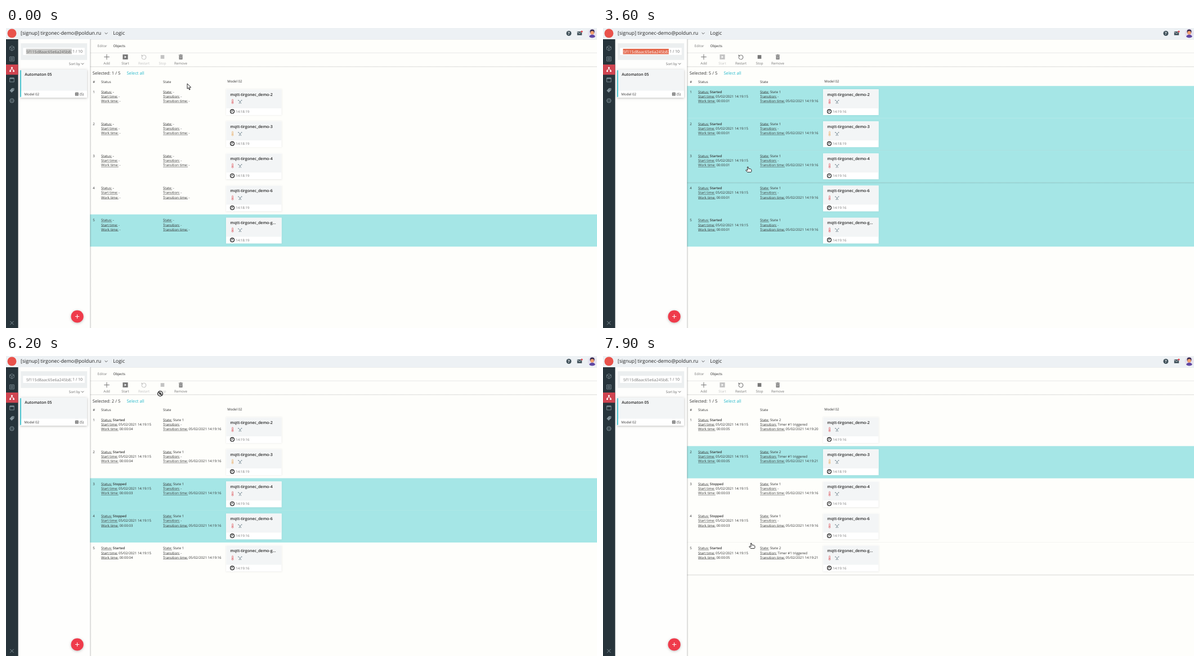
An HTML page with a canvas for the animation above (8 s loop, 1050x534 px).

```html
<!DOCTYPE html>
<html lang="en">
<head>
<meta charset="utf-8">
<title>Logic</title>
<style>
html, body { margin: 0; width: 100%; height: 100%; overflow: hidden; background: #fefefb; }
canvas { display: block; width: 1050px; height: 534px; }
</style>
</head>
<body>
<canvas id="stage" width="1050" height="534"></canvas>
<script>
const ctx = document.getElementById('stage').getContext('2d');
const LOOP = 8000, STEP = 100;
const ROW_TOP = 103.2, ROW_H = 57.15;
const TEAL = '#a5e6e6', INK = '#333', CREAM = '#fefefb', GREY = '#f3f5f6';
const BUTTONS = [['Add', 179], ['Start', 212], ['Restart', 245], ['Stop', 278], ['Remove', 310.5]];
const NAMES = ['2', '3', '4', '6', 'g...'].map(s => 'mqtt-tirgonec_demo-' + s);

// start time, steps, target x, target y
const MOVES = [
  [100, 2, 270, 82], [400, 1, 245.5, 78.5], [1000, 4, 212, 61], [3100, 6, 258, 247],
  [4000, 3, 246, 299], [4600, 9, 273, 62], [6800, 4, 289.5, 207.5], [7600, 4, 264, 333]
];

function text(str, x, y, size = 6.08, color = INK, weight = 400, align = 'left') {
  ctx.font = `${weight} ${size}px "Open Sans", "Noto Sans", sans-serif`;
  ctx.fillStyle = color;
  ctx.textAlign = align;
  ctx.fillText(str, x, y);
  return ctx.measureText(str).width;
}
function rect(x, y, w, h, color) {
  ctx.fillStyle = color;
  ctx.fillRect(x, y, w, h);
}
function disc(x, y, r, color) {
  ctx.fillStyle = color;
  ctx.beginPath();
  ctx.arc(x, y, r, 0, 7);
  ctx.fill();
}
function ring(x, y, r, color, width = 1) {
  ctx.strokeStyle = color;
  ctx.lineWidth = width;
  ctx.beginPath();
  ctx.arc(x, y, r, 0, 7);
  ctx.stroke();
}
function frame(x, y, w, h, color, width = 1) {
  ctx.strokeStyle = color;
  ctx.lineWidth = width;
  ctx.strokeRect(x, y, w, h);
}
function line(color, width, ...p) {
  ctx.strokeStyle = color;
  ctx.lineWidth = width;
  ctx.beginPath();
  for (let i = 0; i < p.length; i += 2) ctx.lineTo(p[i], p[i + 1]);
  ctx.stroke();
}
function poly(x, y, pts, fill, stroke) {
  ctx.beginPath();
  for (let i = 0; i < pts.length; i += 2) ctx.lineTo(x + pts[i], y + pts[i + 1]);
  ctx.closePath();
  ctx.fillStyle = fill;
  ctx.fill();
  if (stroke) {
    ctx.strokeStyle = stroke;
    ctx.lineWidth = 0.9;
    ctx.stroke();
  }
}
function shadow(blur, alpha, dy, draw) {
  ctx.save();
  ctx.shadowColor = `rgba(0,0,0,${alpha})`;
  ctx.shadowBlur = blur;
  ctx.shadowOffsetY = dy;
  draw();
  ctx.restore();
}
function fade(x, y, w, h, horizontal, alpha) {
  const g = ctx.createLinearGradient(x, y, horizontal ? x + w : x, horizontal ? y : y + h);
  g.addColorStop(0, `rgba(0,0,0,${alpha})`);
  g.addColorStop(1, 'rgba(0,0,0,0)');
  rect(x, y, w, h, g);
}

function pointerAt(t) {
  let x = 322, y = 99;
  for (const [start, steps, tx, ty] of MOVES) {
    if (t < start) break;
    const k = Math.min(1, ((t - start) / STEP + 1) / steps);
    const e = k * k * (3 - 2 * k);
    x += (tx - x) * e;
    y += (ty - y) * e;
  }
  return { x, y };
}

function stateAt(t) {
  const p = pointerAt(t);
  const running = (t >= 1900 && t < 5800) || t >= 7300;
  const stopping = t >= 5600 && t < 5800;
  const enabled = [true, !running, running, running && !stopping, true];
  const row = Math.floor((p.y - ROW_TOP) / ROW_H);
  const button = p.y > 46 && p.y < 68 ? BUTTONS.findIndex(b => Math.abs(p.x - b[1]) < 14) : -1;
  const onLink = p.y > 76 && p.y < 85 && p.x > 213 && p.x < 247;
  const selected = t < 800 ? [4] : t < 3700 ? [0, 1, 2, 3, 4] : t < 4400 ? [2] : t < 7300 ? [2, 3] : [1];
  let cursor = 'arrow';
  if (row >= 0 && row < 5 || onLink) cursor = 'hand';
  if (button >= 0) cursor = enabled[button] || stopping ? 'hand' : 'blocked';
  return { t, p, enabled, row, button, onLink, selected, cursor };
}

function rowData(i, t) {
  if (t < 1900 + i * STEP) return ['-', '-', '-', '-', '-', '-'];
  const day = '05/02/2021 14:19:';
  const stopped = (i === 2 || i === 3) && t >= 5800;
  const lag = i < 4 ? 0 : t > 7000 ? 200 : 100;
  const secs = stopped ? 3 : Math.max(0, Math.floor((t - 2100 - lag) / 1000));
  const fired = i === 0 ? t >= 7000 : (i === 1 || i === 4) && t >= 7300;
  const moved = fired ? (i === 0 ? 20 : 21) : t < 2600 ? 15 : 16;
  return [
    stopped ? 'Stopped' : 'Started', day + 15, '00:00:0' + secs,
    fired ? 'State 2' : 'State 1', fired ? 'Timer #1 triggered' : '-', day + moved
  ];
}

function field(label, value, x, y, weight) {
  const w = text(label, x, y);
  rect(x, y + 0.6, w, 0.5, INK);
  text(value, x + w + 1.6, y, undefined, INK, weight);
}

function network(x, y, color) {
  for (const side of [-1, 1]) {
    line(color, 0.5, x, y, x + side * 2.6, y - 2);
    line(color, 0.5, x, y, x + side * 1.3, y + 2.6);
    ring(x + side * 2.8, y - 2.2, 0.6, color, 0.6);
    disc(x + side * 1.4, y + 2.8, 0.7, color);
  }
  disc(x, y, 0.7, color);
}

function drawRow(i, s) {
  const y = ROW_TOP + i * ROW_H, on = s.selected.includes(i);
  if (on) rect(149, y, 901, ROW_H + 0.2, TEAL);
  const d = rowData(i, s.t);
  text(i + 1, 154.3, y + 12.5);
  ['Status:', 'Start time:', 'Work time:', 'State:', 'Transition:', 'Transition time:'].forEach((label, k) =>
    field(label, d[k], k < 3 ? 169 : 279, y + 12.5 + (k % 3) * 8.22, k ? 400 : 600));

  shadow(2, on ? 0.06 : 0.1, 0.3, () => rect(391, y + 5.8, 98.7, 46, '#fff'));
  rect(391.4, y + 6.2, 98, 33.6, GREY);
  text(NAMES[i], 398.3, y + 17.5, 7.03, '#222', 600);

  const heat = i === 1 ? '#e8ad62' : '#df5a60';
  ctx.strokeStyle = heat;
  ctx.lineWidth = 0.7;
  ctx.beginPath();
  ctx.roundRect(401.6, y + 23.8, 1.9, 5.4, 0.9);
  ctx.stroke();
  ring(402.5, y + 30, 1.4, heat, 0.8);
  network(415.8, y + 27.8, '#58707c');

  ring(402, y + 45.4, 3.4, '#111', 1.2);
  line('#111', 0.9, 402, y + 43, 402, y + 45.6, 400.5, y + 45.6);
  const updated = s.t >= 2600 && i !== 1;
  text(updated ? '14:19:16' : '14:18:19', 408.3, y + 47.8, 6.08, '#777');
}

function hoverEdge(i) {
  if (i < 0 || i > 4) return;
  const y = ROW_TOP + i * ROW_H;
  rect(149, y - 0.4, 901, 0.7, 'rgba(0,0,0,.06)');
  fade(149, y + ROW_H, 901, 2.6, false, 0.13);
}

function toolIcon(k, x, c) {
  const y = 51.5;
  if (k === 0) {
    rect(x - 4.8, y - 0.5, 9.6, 1, c);
    rect(x - 0.5, y - 4.8, 1, 9.6, c);
  } else if (k === 1) {
    rect(x - 4.6, y - 4.4, 9.2, 8.8, c);
    poly(x, y, [-1.4, -2.2, 2, 0, -1.4, 2.2], '#fff');
  } else if (k === 2) {
    ctx.strokeStyle = c;
    ctx.lineWidth = 1.1;
    ctx.beginPath();
    ctx.arc(x, y + 0.5, 3.8, -2.2, 3.3);
    ctx.stroke();
    poly(x, y, [-4.4, -4.4, -4.4, -0.8, -0.9, -0.9], c);
  } else if (k === 3) {
    rect(x - 3.3, y - 3.3, 6.6, 6.6, c);
  } else {
    rect(x - 3.7, y - 3.9, 7.4, 1.1, c);
    rect(x - 1.3, y - 4.7, 2.6, 1, c);
    rect(x - 3, y - 2.2, 6, 6.7, c);
    for (const dx of [-1.2, 1.2]) rect(x + dx - 0.3, y - 1, 0.6, 4.2, '#fff');
  }
}

function drawTop() {
  rect(0, 0, 1050, 20, '#edf1f4');
  disc(10.5, 9.5, 8, '#e9524b');
  text('[signup] tirgonec-demo@poldun.ru', 26, 12.4, 8.75, '#222');
  line('#444', 0.9, 175.6, 8.3, 178, 10.7, 180.4, 8.3);
  text('Logic', 190.2, 12.4, 8.75, '#222');

  disc(1000, 9.5, 4.5, '#42535c');
  text('?', 1000, 12, 7, '#fff', 700, 'center');
  rect(1014.8, 6.2, 8.4, 6.6, '#42535c');
  line('#edf1f4', 0.8, 1015, 7, 1019, 9.8, 1023, 7);
  disc(1023, 6.2, 1.5, '#e53945');

  disc(1041.5, 9.5, 8, '#e5e1ef');
  ctx.save();
  ctx.beginPath();
  ctx.arc(1041.5, 9.5, 8, 0, 7);
  ctx.clip();
  disc(1041.5, 17.2, 5.6, '#6047a3');
  disc(1041.5, 6.5, 4, '#35294f');
  disc(1041.5, 8.4, 3.2, '#f2a06f');
  ctx.restore();
}

function drawMain(s) {
  rect(149, 20, 901, 514, CREAM);
  rect(149, 20, 901, 0.6, '#e2e5e7');
  text('Editor', 162.6, 33.6, 6.08, '#777');
  text('Objects', 190.6, 33.6, 6.08, '#222');
  rect(149, 43.8, 901, 0.8, '#e3e3e1');
  BUTTONS.forEach(([label, x], k) => {
    const c = !s.enabled[k] ? '#c3c3c3' : s.button === k ? '#555' : '#777';
    toolIcon(k, x, c);
    text(label, x, 65.3, 6.08, c, 400, 'center');
  });
  fade(149, 68.4, 901, 1.8, false, 0.15);

  text(`Selected: ${s.selected.length} / 5`, 153.7, 82.5, 7.66, INK);
  const w = text('Select all', 214.4, 82.5, 7.66, '#27b9cb');
  if (s.onLink) rect(214.4, 83.4, w, 0.7, '#27b9cb');
  text('#', 154.2, 97.9);
  text('Status', 169, 97.9);
  text('State', 279, 97.9);
  text('Model 02', 393.2, 97.3);
  for (let i = 0; i < 5; i++) drawRow(i, s);
  hoverEdge(s.row);
}

function drawPanel(s) {
  rect(21.5, 20, 127.8, 514, '#fefefd');
  fade(149.2, 20, 2.6, 514, true, 0.2);
  rect(26.3, 27.2, 117.8, 29.6, '#eceff0');
  rect(30.3, 35.3, 109.5, 12.6, '#fff');
  const mode = s.t < 800 ? 0 : s.t < 3700 ? 1 : 2;
  if (mode < 2) rect(35.6, 37, 81.2, 9.6, ['#cdcdcb', '#e4694d'][mode]);
  ctx.save();
  ctx.beginPath();
  ctx.rect(35, 36, 81.6, 12);
  ctx.clip();
  text('5f115d8aac65e6a245b82', 36, 44.5, 7.11, ['#666', '#fff', '#777'][mode]);
  ctx.restore();
  text('1 / 10', 117.9, 44.4, 7, '#666');
  text('Sort by', 111.8, 65.6, 6.08, '#666');
  line('#555', 0.9, 133.8, 62.6, 136, 64.8, 138.2, 62.6);

  shadow(4, 0.26, 1, () => rect(25.2, 74, 118.8, 50, '#fff'));
  rect(25.2, 74, 118.8, 37.6, GREY);
  rect(25.2, 75.2, 1.7, 47.6, '#35c0cd');
  text('Automaton 05', 33.3, 85.4, 7, '#222', 600);
  text('Model 02', 32.6, 120, 6.08, INK);
  frame(123.4, 115.4, 4.8, 4.6, '#444', 1);
  rect(124.7, 116.7, 2.2, 2, '#444');
  text('(5)', 131, 120, 6.08, INK);

  shadow(4, 0.25, 1, () => disc(126.6, 513.5, 11.1, '#ef3b4b'));
  rect(123, 513, 7.2, 1, '#fff');
  rect(126.1, 509.9, 1, 7.2, '#fff');
}

function drawSidebar() {
  const c = '#82929a', x = 10.5;
  rect(0, 20, 21.5, 514, '#27343b');
  rect(0, 65, 21.5, 18.2, '#cf4450');
  // cube
  line(c, 0.8, x, 31.8, x + 3.8, 33.8, x + 3.8, 38.2, x, 40.3, x - 3.8, 38.2, x - 3.8, 33.8, x, 31.8);
  line(c, 0.8, x - 3.8, 33.8, x, 36, x + 3.8, 33.8);
  line(c, 0.8, x, 36, x, 40.3);
  // board
  frame(x - 3.8, 51.4, 7.6, 7.4, c, 0.9);
  frame(x - 1.5, 53.6, 3, 3, c, 0.9);
  // hierarchy
  rect(x - 1.4, 69.6, 2.8, 2.8, '#fff');
  line('#fff', 0.8, x, 72, x, 74, x - 3, 74, x - 3, 76);
  line('#fff', 0.8, x, 74, x + 3, 74, x + 3, 76);
  for (const dx of [-4.3, 1.7]) rect(x + dx, 75.4, 2.7, 2.7, '#fff');
  // calendar
  frame(x - 3.8, 89, 7.6, 7, c, 0.9);
  rect(x - 3.8, 88.6, 7.6, 2, c);
  // tag
  poly(x, 111, [0.2, -4, 4, -4, 4, -0.2, -0.4, 4, -4, 0.4], c);
  disc(x + 2.2, 108.8, 0.7, '#27343b');
  // wheel
  ring(x, 129.3, 3.7, c, 0.9);
  for (let a = 0; a < 6; a++) {
    const dx = Math.cos(a * Math.PI / 3), dy = Math.sin(a * Math.PI / 3);
    line(c, 0.7, x + dx, 129.3 + dy, x + dx * 3.6, 129.3 + dy * 3.6);
  }
  // tools
  line(c, 1, x - 3.2, 521.8, x + 3.2, 528.2);
  line(c, 1, x + 3.2, 521.8, x - 3.2, 528.2);
}

function drawCursor({ p: { x, y }, cursor }) {
  if (cursor === 'arrow') {
    poly(x, y, [0, 0, 0, 9.2, 2.1, 7.4, 3.7, 11, 5.1, 10.4, 3.6, 6.9, 6.6, 6.7], '#fff', '#111');
  } else if (cursor === 'hand') {
    poly(x, y, [-1.6, 0.4, 0, 0.4, 0.9, 3.6, 4.6, 4, 5.8, 5.2, 5.8, 8.4, 5, 9.6, -1.2, 9.6, -4.2, 6.8, -3.8, 5.6, -0.9, 6.2],
      '#fff', '#111');
  } else {
    disc(x + 1, y + 5, 5.4, '#fff');
    ring(x + 1, y + 5, 4.4, '#222', 1.4);
    ring(x + 1, y + 5, 1.7, '#222', 0.9);
    line('#222', 1.3, x - 2, y + 2, x + 4, y + 8);
  }
}

function render(now) {
  const t = Math.floor((now % LOOP) / STEP) * STEP;
  const s = stateAt(t);
  ctx.textRendering = 'geometricPrecision';
  ctx.lineJoin = 'round';
  drawMain(s);
  drawPanel(s);
  drawSidebar();
  drawTop();
  drawCursor(s);
}

const begin = performance.now();
function tick() {
  render(performance.now() - begin);
  requestAnimationFrame(tick);
}
tick();
</script>
</body>
</html>
```
